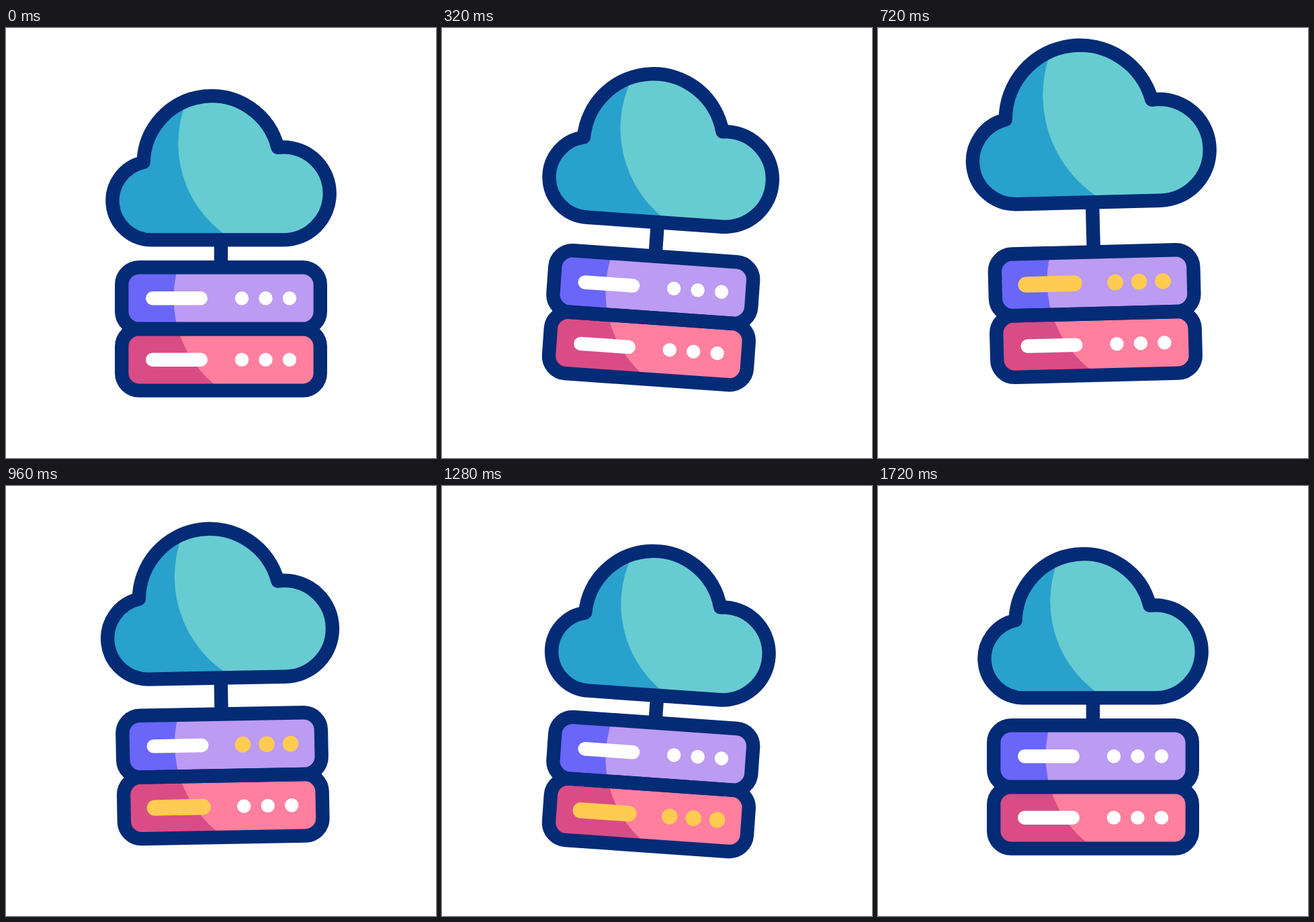
An HTML page for the animation above (1.84 s loop, 640 px wide and 640 px high).

```html
<!DOCTYPE html>
<html lang="en">
<head>
<meta charset="utf-8">
<title>Cloud server</title>
<style>
  html, body { margin: 0; height: 100%; overflow: hidden; background: #fff; }
  svg { display: block; width: 100vw; height: 100vh; }
  .line { fill: none; stroke: #042b76; stroke-width: 20.4; stroke-linejoin: round; }
  .bar { stroke-linecap: round; }
</style>
</head>
<body>
<svg viewBox="0 0 640 640">
  <defs>
    <path id="cloudShape" d="M217 315.4A58.4 58.4 0 0 1 204.6 199.9A101.5 101.5 0 0 1 404.5 177.9A69 69 0 0 1 412.7 177.4A69 69 0 0 1 412.7 315.4Z"/>
    <rect id="topShape" x="172.2" y="356.2" width="295.6" height="91.8" rx="26"/>
    <rect id="bottomShape" x="172.2" y="448" width="295.6" height="91.6" rx="26"/>
    <clipPath id="cloudClip"><use href="#cloudShape"/></clipPath>
    <clipPath id="topClip"><use href="#topShape"/></clipPath>
    <clipPath id="bottomClip"><use href="#bottomShape"/></clipPath>
  </defs>
  <g id="icon">
    <path id="stem" class="line"/>
    <use href="#topShape" fill="#6a66f8"/>
    <circle cx="416" cy="402" r="166.5" fill="#bc9bf2" clip-path="url(#topClip)"/>
    <use href="#bottomShape" fill="#da4c86"/>
    <circle cx="416" cy="402" r="166.5" fill="#ff7f9f" clip-path="url(#bottomClip)"/>
    <use href="#topShape" class="line"/>
    <use href="#bottomShape" class="line"/>
    <g id="lights"></g>
    <g id="cloud">
      <use href="#cloudShape" fill="#28a1cd"/>
      <circle cx="422.8" cy="172" r="166.5" fill="#67ccd1" clip-path="url(#cloudClip)"/>
      <use id="cloudLine" href="#cloudShape" class="line"/>
    </g>
  </g>
</svg>
<script>
const STEP = 40, STEPS = 46, LINE = 20.4, BASE = 315.4;
const byId = id => document.getElementById(id);
const icon = byId('icon'), cloud = byId('cloud'), cloudLine = byId('cloudLine');
const stem = byId('stem'), lights = byId('lights');

// Keys are [step, value]
const tilt = [[1, 0], [8, 4], [13.5, 5], [21, -5], [28, 5], [32, 4], [43, 0]];
const lift = [[1, 0], [8, 16.4], [12, 24], [14.5, 24.6], [18, 22.8], [24, 16.7], [29, 6.6], [32, 3.6], [43, 0]];
const swell = [[4, 0], [15.6, 1], [29.8, 0]];

// Slope at a key; flat at the ends and at turning points
function slope(keys, i) {
  const a = keys[i - 1], b = keys[i], c = keys[i + 1];
  if (!a || !c || (b[1] - a[1]) * (c[1] - b[1]) <= 0) return 0;
  return (c[1] - a[1]) / (c[0] - a[0]);
}

function valueAt(keys, x) {
  const i = keys.findIndex(key => key[0] > x);
  if (i === 0) return keys[0][1];
  if (i < 0) return keys[keys.length - 1][1];
  const [x0, y0] = keys[i - 1], [x1, y1] = keys[i];
  const h = x1 - x0, u = (x - x0) / h, v = 1 - u;
  return y0 + (y1 - y0) * u * u * (3 - 2 * u)
    + h * u * v * (slope(keys, i - 1) * v - slope(keys, i) * u);
}

function addLight(d, start) {
  const path = document.createElementNS('http://www.w3.org/2000/svg', 'path');
  path.setAttribute('class', 'bar');
  path.setAttribute('d', d);
  lights.append(path);
  return { path, start };
}

const dots = y => [351, 386.5, 422].map(x => `M${x} ${y}h.01`).join('');
const bar = y => `M218.2 ${y}H289.8`;
const lamps = [
  addLight(bar(402.2), 10), addLight(dots(402.2), 16),
  addLight(bar(493.8), 22), addLight(dots(493.8), 28)
];

const clamp = x => Math.max(0, Math.min(1, x));
const mix = (a, b, k) => a + (b - a) * k;

function draw(step) {
  const p = valueAt(swell, step), scale = 1 + 0.1 * p, cloudY = BASE - 36 * p;
  icon.setAttribute('transform',
    `translate(0 ${-valueAt(lift, step)}) rotate(${valueAt(tilt, step)} 320 320)`);
  cloud.setAttribute('transform',
    `translate(320 ${cloudY}) scale(${scale}) translate(-320 ${-BASE})`);
  cloudLine.style.strokeWidth = LINE / scale;
  stem.setAttribute('d', `M320 ${cloudY}V356`);
  for (const { path, start } of lamps) {
    const on = clamp((step - start) / 2) * clamp((start + 14 - step) / 2);
    path.setAttribute('stroke', `rgb(255 ${mix(255, 203, on)} ${mix(255, 80, on)})`);
    path.setAttribute('stroke-width', mix(LINE, 23.6, on));
  }
}

function tick() {
  draw(Math.floor(performance.now() / STEP) % STEPS);
  requestAnimationFrame(tick);
}
tick();
</script>
</body>
</html>
```
